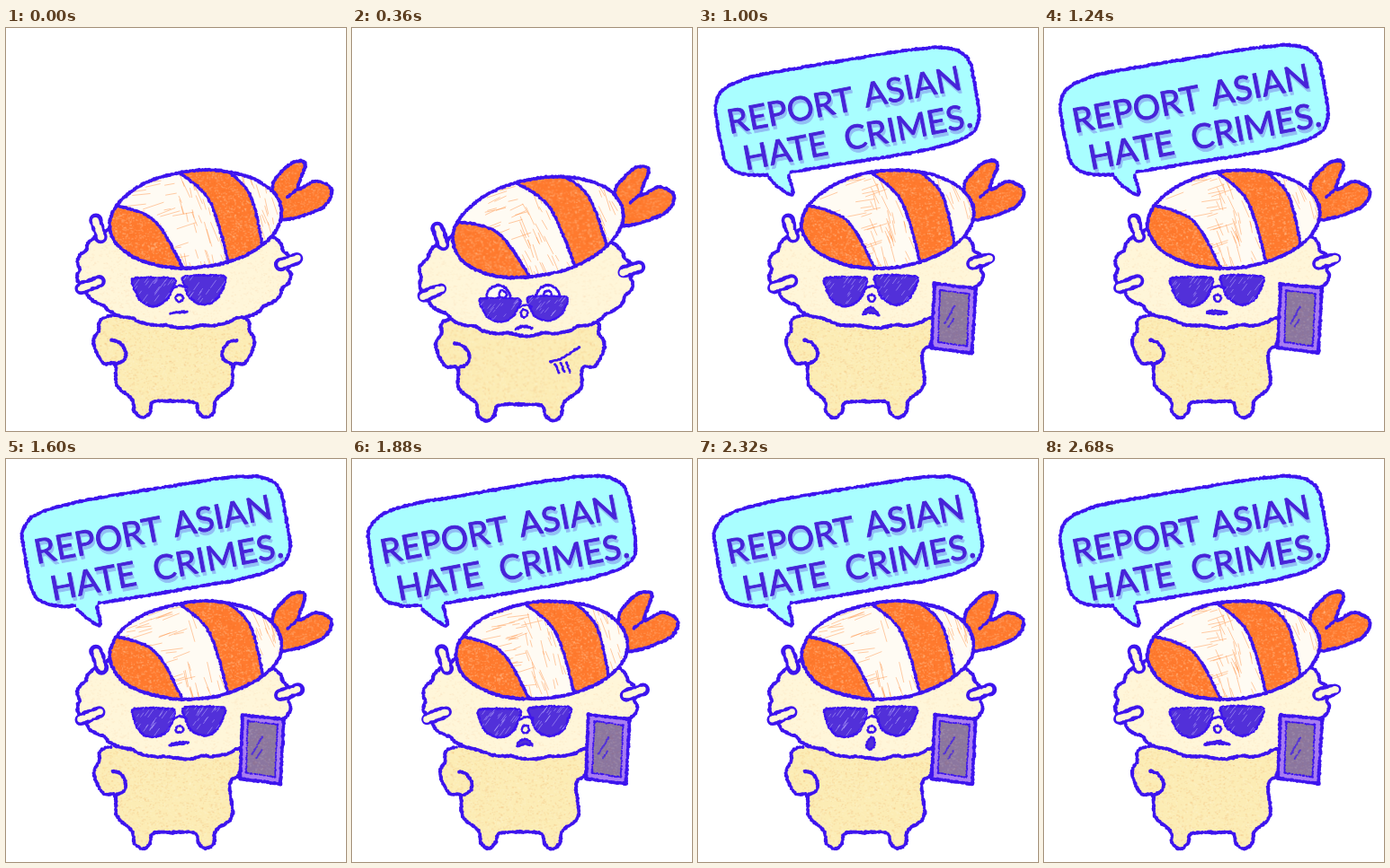
Write an HTML page with a canvas that moves like this. It is 378x449 px and loops after 2.72 s.

```html
<!DOCTYPE html>
<html lang="en">
<head>
<meta charset="utf-8">
<title>Shrimp sushi speaks up</title>
<style>
html, body { margin: 0; width: 100%; height: 100%; overflow: hidden; background: #fff; }
canvas { display: block; }
</style>
</head>
<body>
<canvas id="stage" width="378" height="449" role="img" aria-label="REPORT ASIAN HATE CRIMES."></canvas>
<script>
const canvas = document.getElementById('stage');
const ctx = canvas.getContext('2d');
const LOOP = 2720, STEP = 40;
const INK = '#3d14ee', LENS = '#5230d9', CREAM = '#fff6d9', BODY = '#fcecb4', ORANGE = '#ff7a2e', SKY = '#a9feff';

let random, boil = 0;

function seeded(seed) {
  return () => {
    seed = (seed + 0x6D2B79F5) | 0;
    let v = Math.imul(seed ^ (seed >>> 15), 1 | seed);
    v = (v + Math.imul(v ^ (v >>> 7), 61 | v)) ^ v;
    return ((v ^ (v >>> 14)) >>> 0) / 4294967296;
  };
}
const jitter = amount => (random() * 2 - 1) * amount;
const clamp01 = x => Math.min(1, Math.max(0, x));
const easeOut = x => 1 - (1 - clamp01(x)) ** 3;
const backOut = x => { const u = clamp01(x) - 1; return 1 + 2.7 * u ** 3 + 1.7 * u * u; };

// Paper grain, tiled over the flat fills.
function makeGrain() {
  const tile = document.createElement('canvas');
  tile.width = tile.height = 160;
  const g = tile.getContext('2d'), rnd = seeded(9);
  for (let i = 0; i < 5200; i++) {
    g.fillStyle = rnd() < 0.62 ? 'rgba(255,250,225,.28)' : 'rgba(222,105,20,.15)';
    g.fillRect(rnd() * 160, rnd() * 160, 1 + rnd() * 1.6, 1 + rnd());
  }
  return ctx.createPattern(tile, 'repeat');
}
const grain = makeGrain();

// Turns [x, y, x, y, ...] into closely spaced points; bend 0 gives straight edges.
function curve(flat, closed = false, bend = 0.5) {
  const knots = [];
  for (let i = 0; i < flat.length; i += 2) knots.push([flat[i] + jitter(0.5), flat[i + 1] + jitter(0.5)]);
  const n = knots.length, out = [];
  const at = i => closed ? knots[(i + n) % n] : knots[Math.min(n - 1, Math.max(0, i))];
  for (let i = 0; i < (closed ? n : n - 1); i++) {
    const [p, a, b, q] = [at(i - 1), at(i), at(i + 1), at(i + 2)];
    const steps = Math.max(2, Math.ceil(Math.hypot(b[0] - a[0], b[1] - a[1]) / 1.3));
    for (let s = 0; s < steps; s++) {
      const u = s / steps, u2 = u * u, u3 = u2 * u;
      out.push([0, 1].map(k =>
        (2 * u3 - 3 * u2 + 1) * a[k] + (u3 - 2 * u2 + u) * bend * (b[k] - p[k]) +
        (3 * u2 - 2 * u3) * b[k] + (u3 - u2) * bend * (q[k] - a[k])));
    }
  }
  if (!closed) out.push(at(n - 1));
  return out;
}

// Ellipse family: power < 1 squares it off, bumps scallop the rim, sag droops the ends.
function oval(cx, cy, rx, ry = rx, { n = 8, power = 1, turn = 0, bumps = 0, sag = 0 } = {}) {
  const bend = v => Math.sign(v) * Math.abs(v) ** power;
  return Array.from({ length: n }, (_, i) => i * 2 * Math.PI / n).flatMap(a => {
    const puff = 1 + bumps * Math.abs(Math.sin(9 * a));
    const u = bend(Math.cos(a)), x = rx * puff * u, y = ry * puff * bend(Math.sin(a)) + sag * u * u;
    return [cx + x * Math.cos(turn) - y * Math.sin(turn), cy + x * Math.sin(turn) + y * Math.cos(turn)];
  });
}

// Reflects an outline across the body axis and reverses its direction.
function mirrored(flat) {
  const out = [];
  for (let i = flat.length - 2; i >= 0; i -= 2) out.push(374 - flat[i], flat[i + 1]);
  return out;
}

function trace(points) {
  ctx.beginPath();
  points.forEach(([x, y]) => ctx.lineTo(x, y));
  ctx.closePath();
}

function paint(points, color, texture = 0) {
  trace(points);
  ctx.fillStyle = color;
  ctx.fill();
  if (!texture) return;
  ctx.save();
  ctx.globalAlpha = texture;
  ctx.fillStyle = grain;
  ctx.translate(boil * 53, boil * 31);
  ctx.fill();
  ctx.restore();
}

// Crayon line: overlapping dabs of uneven size.
function crayon(points, width = 3.8, color = INK) {
  ctx.fillStyle = color;
  ctx.beginPath();
  for (const [x, y] of points) {
    const cx = x + jitter(0.5), cy = y + jitter(0.5), r = width / 2 * (0.8 + random() * 0.42);
    ctx.moveTo(cx + r, cy);
    ctx.arc(cx, cy, r, 0, 7);
  }
  ctx.fill();
}

function shape(flat, color, { texture = 0, width = 3.8, bend = 0.5 } = {}) {
  const points = curve(flat, true, bend);
  paint(points, color, texture);
  crayon(points, width);
  return points;
}

const line = (flat, width, color) => crayon(curve(flat), width, color);

function placed(dx, dy, draw, { turn = 0, sx = 1, sy = 1, cx = 0, cy = 0 } = {}) {
  ctx.save();
  ctx.translate(cx + dx, cy + dy);
  ctx.rotate(turn);
  ctx.scale(sx, sy);
  ctx.translate(-cx, -cy);
  draw();
  ctx.restore();
}

// Short parallel pencil strokes inside a clipped area.
function hatch(points, count, angleAt, reach, color, width) {
  const xs = points.map(p => p[0]), ys = points.map(p => p[1]);
  const [left, top] = [Math.min(...xs), Math.min(...ys)];
  const [w, h] = [Math.max(...xs) - left, Math.max(...ys) - top];
  ctx.save();
  trace(points);
  ctx.clip();
  ctx.strokeStyle = color;
  ctx.lineWidth = width;
  ctx.beginPath();
  for (let i = 0; i < count; i++) {
    const x = left + random() * w, y = top + random() * h;
    const angle = angleAt(x), length = reach * (0.4 + random());
    ctx.moveTo(x, y);
    ctx.lineTo(x + length * Math.cos(angle), y + length * Math.sin(angle));
  }
  ctx.stroke();
  ctx.restore();
}

function lettering(word, x, y) {
  placed(x, y, () => {
    ctx.font = '38px Lato, "Open Sans", sans-serif';
    ctx.lineJoin = 'round';
    ctx.lineWidth = 0.9;
    for (const [dx, dy, color] of [[1, 4, '#92bff4'], [0, 0, '#4723d8']]) {
      ctx.fillStyle = ctx.strokeStyle = color;
      ctx.fillText(word, dx, dy);
      ctx.strokeText(word, dx, dy);
    }
  }, { turn: -0.187 });
}

function drawBubble(size) {
  placed(0, 0, () => {
    shape(oval(167, 91.5, 147, 58, { n: 64, power: 0.4, turn: -0.165 }), SKY, { bend: 0 });
    const tail = curve([79, 167, 91, 178, 105, 185, 101, 164]);
    paint([[77, 158], ...tail, [103, 154]], SKY);
    crayon(tail);
    lettering('REPORT', 34, 117);
    lettering('ASIAN', 188, 87);
    lettering('HATE', 52, 158);
    lettering('CRIMES.', 166, 136);
  }, { sx: size, sy: size, cx: 105, cy: 185 });
}

const ARM = [120, 320, 103, 338, 98, 352, 108, 373, 121, 375];
const TUCKED_ARM = [120, 320, 114, 350, 125, 362];
const LEG = [123, 398, 140, 414, 143, 428, 152, 434, 160, 428, 164, 417, 187, 416];
const HAND = [121, 375, 131, 370, 133, 361, 127, 351, 118, 348];

function drawBody(arm, pose) {
  placed(0, 4 * pose, () => {
    const right = [...(arm === 'phone' ? TUCKED_ARM : ARM), ...LEG];
    shape([...ARM, ...LEG, ...mirrored(right)], BODY, { texture: 0.5 });
    line(HAND);
    if (arm === 'hip') line(mirrored(HAND));
    if (arm === 'reach') {
      line([219, 368, 232, 364, 249, 352], 3);
      for (let i = 0; i < 3; i++) line([224 + 6 * i, 371 - i, 228 + 6 * i, 380], 2.6);
    }
  }, { sx: 1 + 0.06 * pose, cx: 190 });
}

function riceGrain(...ends) {
  const points = curve(ends);
  crayon(points, 13);
  crayon(points, 6.3, CREAM);
}

function drawHead() {
  shape(oval(198, 269, 116, 63, { n: 72, bumps: 0.035 }), CREAM, { texture: 0.25 });
  riceGrain(100, 214, 106, 233);
  riceGrain(83, 290, 104, 282);
  riceGrain(305, 263, 324, 257);
}

function drawTail() {
  shape([296, 178, 305, 161, 320, 149, 333, 152, 325, 179, 345, 171, 362, 181, 350, 201, 302, 213], ORANGE, { texture: 0.5 });
  line([313, 189, 325, 179], 3.4);
}

function drawShell() {
  const outline = curve(oval(211, 213, 96, 54, { n: 24, turn: -0.1 }), true);
  const first = curve([116, 196, 165, 214, 198, 270]);
  const second = curve([188, 158, 226, 193, 249, 268]);
  const third = curve([238, 154, 271, 185, 287, 250]);
  paint(outline, '#fffbf3');
  hatch(outline, 130, x => x > 190 ? 1.25 + jitter(0.15) : -0.25 + jitter(0.15), 18, 'rgba(255,138,58,.55)', 0.8);
  ctx.save();
  trace(outline);
  ctx.clip();
  paint([...first, [198, 295], [95, 295], [95, 190]], ORANGE, 0.6);
  paint([...second, ...third.slice().reverse()], ORANGE, 0.6);
  [first, second, third].forEach(edge => crayon(edge, 3.4));
  ctx.restore();
  crayon(outline);
}

// Flat on top, half an oval below.
function drawLens(cx, top) {
  const flat = [];
  for (let i = 0; i <= 8; i++) {
    const a = i * Math.PI / 8;
    flat.push(cx + 22 * Math.cos(a), top + 31 * Math.sin(a) ** 0.8);
  }
  const points = shape(flat, LENS, { width: 2.8, bend: 0.35 });
  hatch(points, 26, () => -0.95, 8, 'rgba(205,195,255,.45)', 1);
}

function drawGlasses() {
  drawLens(164, 279);
  drawLens(220, 277);
  line([186, 290, 193, 287, 201, 289], 2.8);
}

// Half width, half height, tilt, droop.
const MOUTHS = {
  calm: [9, 0.4, -0.08, 0],
  worry: [9, 0.9, -0.1, 3],
  slant: [11, 1, -0.14, 0],
  oval: [11, 2, 0, 0],
  wide: [14, 1.6, -0.04, 2],
  frown: [9, 3, 0, 5],
  round: [4.5, 6.5, 0.3, 0]
};
const SPEECH = ['wide', 'frown', 'round', 'slant', 'oval', 'wide', 'frown', 'round', 'oval', 'slant', 'round'];

function drawMouth(name) {
  const [rx, ry, turn, sag] = MOUTHS[name];
  shape(oval(192, 317 - sag / 2, rx, ry, { turn, sag }), LENS, { width: 2.5 });
}

function drawFace(pose, mouth) {
  if (pose > 0.3) {
    for (const [x, look] of [[167, 5], [222, 0]]) {
      shape(oval(x, 291, 13), '#fffdf2', { width: 3 });
      shape(oval(x + look, 288, 4.2), '#fffdf2', { width: 2.6 });
    }
  }
  placed(4 * pose, 13 * pose, drawGlasses, { sx: 1 - 0.06 * pose, sy: 1 - 0.18 * pose, cx: 191, cy: 294 });
  placed(3 * pose, 9 * pose, () => {
    crayon(curve(oval(193, 301, 4), true), 2.6);
    drawMouth(mouth);
  });
}

function drawPhone() {
  const frame = [263, 285, 309, 290, 305, 362, 260, 356];
  shape(frame, '#a77df0', { bend: 0 });
  const screen = curve(frame.map((v, i) => i % 2 ? 323 + (v - 323) * 0.81 : 284 + (v - 284) * 0.7), true, 0);
  paint(screen, '#8b769f', 0.25);
  crayon(screen, 2);
  line([274, 329, 285, 310], 2.2, LENS);
  line([279, 333, 284, 325], 2, LENS);
}

const poseAt = t => backOut((t - 240) / 280) - backOut((t - 800) / 200);

function drawScene(frame) {
  const onTwos = frame < 13;
  const t = (onTwos ? frame & ~1 : frame) * STEP;
  const pose = t < 240 || t >= 1000 ? 0 : poseAt(t);
  boil = Math.floor((frame + (onTwos ? 0 : 1)) / 2) % 3;
  random = seeded(boil * 977 + 5);

  const arm = t >= 880 ? 'phone' : pose > 0.5 ? 'reach' : 'hip';
  const mouth = t >= 1000 ? SPEECH[Math.floor(frame / 2) % SPEECH.length] : pose > 0.5 ? 'worry' : 'calm';
  const bubble = easeOut((t - 880) / 160);

  ctx.fillStyle = '#fff';
  ctx.fillRect(0, 0, canvas.width, canvas.height);
  if (bubble > 0) drawBubble(bubble);
  drawBody(arm, pose);
  placed(-5 * pose, 10 * pose, drawHead);
  placed(-4 * pose, 7 * pose, drawTail);
  placed(-5 * pose, 10 * pose, drawShell, { turn: -0.12 * pose, cx: 210, cy: 213 });
  placed(-5 * pose, 10 * pose, () => drawFace(pose, mouth));
  if (arm === 'phone') drawPhone();
}

let shown = -1;
const start = performance.now();
function tick() {
  const frame = Math.floor(((performance.now() - start) % LOOP) / STEP);
  if (frame !== shown) drawScene(shown = frame);
  requestAnimationFrame(tick);
}
tick();
</script>
</body>
</html>
```
